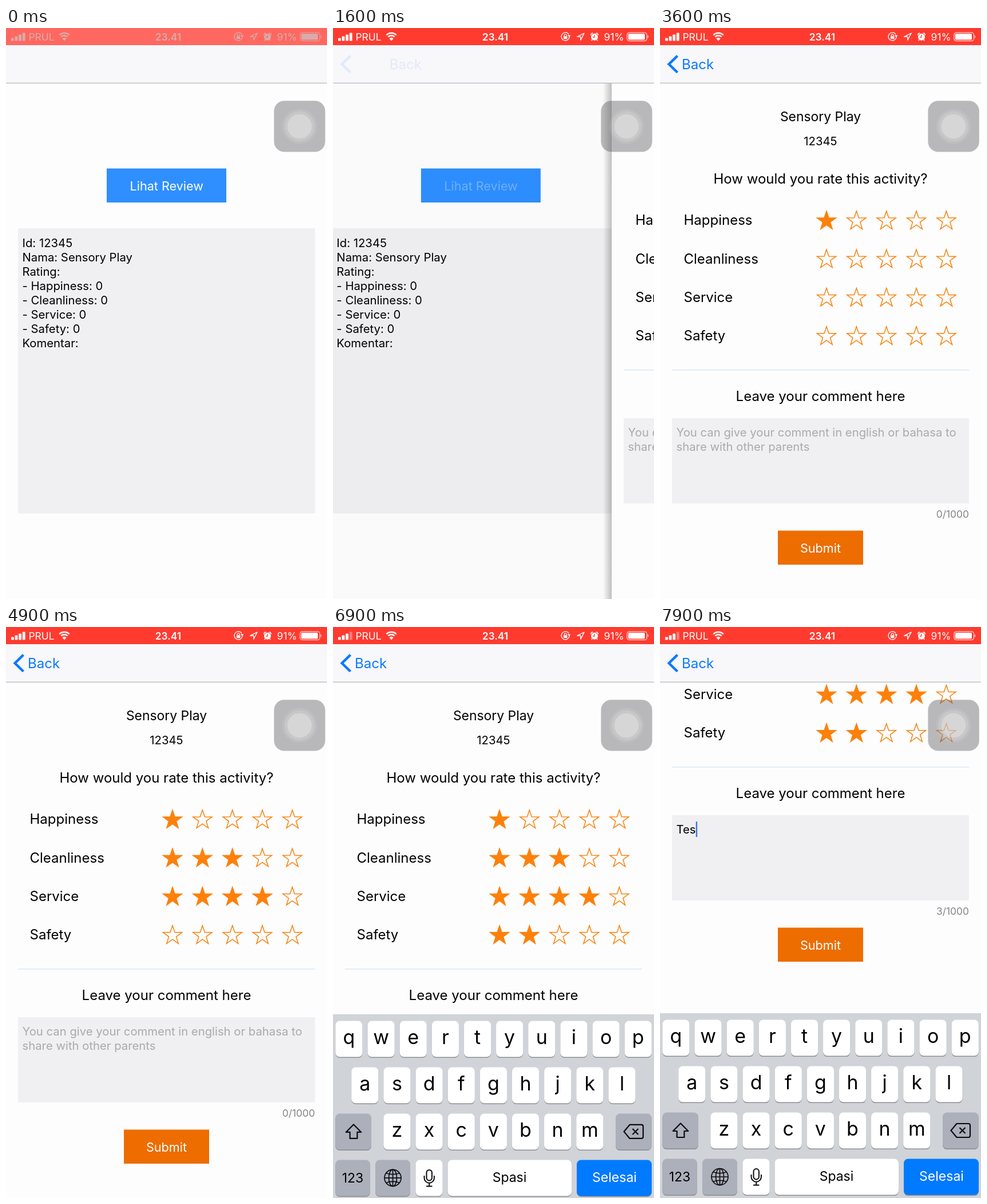
Recreate the animation shown at these times as an HTML page. Size 561 by 998 pixels, loop 8000 ms.

```html
<!DOCTYPE html>
<html lang="id">
<head>
<meta charset="utf-8">
<title>Activity review</title>
<style>
html, body { margin: 0; width: 100%; height: 100%; overflow: hidden; background: #fdfdfe; }
svg { display: block; width: 100vw; height: 100vh; }
text { font-family: Inter, Roboto, "Liberation Sans", sans-serif; white-space: pre; }
</style>
</head>
<body>
<svg id="stage" viewBox="0 0 561 998" xmlns="http://www.w3.org/2000/svg"></svg>
<script>
const W = 561, H = 998, LOOP = 8000;
const stage = document.getElementById('stage');
const ROWS = ['Happiness', 'Cleanliness', 'Service', 'Safety'];
const RATINGS = [[3600, 1], [4200, 3], [4900, 4], [5700, 2]];
const TYPED = [[7400, 'T'], [7600, 'Te'], [7800, 'Tes']];

const text = (x, y, size, str, attrs = '') =>
  `<text x="${x}" y="${y}" font-size="${size}" ${attrs}>${str}</text>`;
const mid = (x, y, size, str, attrs = '') =>
  text(x, y, size, str, 'text-anchor="middle" ' + attrs);
const rect = (x, y, w, h, fill, attrs = '') =>
  `<rect x="${x}" y="${y}" width="${w}" height="${h}" fill="${fill}" ${attrs}/>`;
const line = (d, attrs = '') =>
  `<path d="${d}" fill="none" stroke="currentColor" ${attrs}/>`;

function star(cx, cy, id) {
  const pts = [];
  for (let i = 0; i < 10; i++) {
    const r = i % 2 ? 6.8 : 17.4, a = i * Math.PI / 5;
    pts.push((cx + r * Math.sin(a)).toFixed(2) + ',' + (cy - r * Math.cos(a)).toFixed(2));
  }
  return `<polygon id="${id}" points="${pts.join(' ')}" fill="none" stroke="#fa820c" stroke-width="1.5" stroke-miterlimit="8"/>`;
}

function detailPage() {
  const lines = ['Id: 12345', 'Nama: Sensory Play', 'Rating:',
    ...ROWS.map(r => `- ${r}: 0`), 'Komentar:'];
  return rect(0, 0, W, H, '#fdfdfe')
    + rect(176, 245.5, 209, 59.5, '#2f8fff')
    + mid(280.7, 283.8, 21.6, 'Lihat Review', 'id="look" fill="#fff"')
    + rect(21, 350, 519, 498.5, '#f0eff2')
    + lines.map((s, i) => text(28.5, 382.7 + 25 * i, 20.3, s)).join('');
}

function reviewPage() {
  let s = rect(0, 0, W, H + 400, '#fdfdfe')
    + mid(280.5, 163.4, 22.9, 'Sensory Play')
    + mid(280.5, 205.2, 20.3, '12345')
    + mid(280.5, 271.5, 24, 'How would you rate this activity?');
  ROWS.forEach((name, r) => {
    s += text(41.5, 344.3 + 67.3 * r, 24, name);
    for (let c = 0; c < 5; c++) s += star(291 + 52.35 * c, 337.3 + 67.3 * r, `star${r}${c}`);
  });
  return s + rect(21, 597, 519, 1.6, '#dbe8f5')
    + mid(280.5, 652.4, 24, 'Leave your comment here')
    + rect(21, 682, 519, 149, '#f0eff2')
    + `<g id="hint" fill="#aaa9ad">`
    + text(28.5, 714, 20.3, 'You can give your comment in english or bahasa to')
    + text(28.5, 739.3, 20.3, 'share with other parents') + '</g>'
    + text(28.5, 714, 20.3, '', 'id="typed"')
    + rect(61, 693, 2.4, 27, '#3b78dd', 'id="caret"')
    + text(540, 855.8, 17.4, '0/1000', 'id="count" text-anchor="end" fill="#858589"')
    + rect(206, 878.5, 149, 59.5, '#ed6d00')
    + mid(280.5, 916.6, 21.6, 'Submit', 'fill="#fff"');
}

function statusBar() {
  const bars = [0, 1, 2, 3].map(i =>
    rect(9 + 6.6 * i, 17.5 - 3 * i, 4.8, 5 + 3 * i, 'currentColor', `rx="1" id="bar${i}"`)).join('');
  const arc = r => {
    const d = r * 0.707;
    return line(`M${102 - d} ${21 - d}A${r} ${r} 0 0 1 ${102 + d} ${21 - d}`, 'stroke-width="2.6"');
  };
  return rect(0, 0, W, 30, '#ff3b30', 'id="statusBg"')
    + '<g id="status" fill="currentColor">' + bars
    + text(39.5, 22, 17.4, 'PRUL')
    + arc(12.2) + arc(7.9) + '<path d="M102 22.5L98.4 18.4A5 5 0 0 1 105.6 18.4Z"/>'
    + mid(283.5, 22, 17.4, '23.41', 'font-weight="600"')
    + line('M412 11.2A7 7 0 1 0 413 16', 'stroke-width="1.3"')
    + '<path d="M409.8 12.6L415.4 12.6L413 16.6Z"/>'
    + rect(403, 14.4, 6.4, 4.8, 'currentColor')
    + line('M404.2 14.4V13A2 2 0 0 1 408.2 13V14.4', 'stroke-width="1.2"')
    + line('M439 9.2L426.8 15.2H432.8V21.3Z', 'stroke-width="1.4" stroke-linejoin="round"')
    + '<circle cx="457" cy="15.7" r="6"/>'
    + line('M450.5 12.5A4 4 0 0 1 454.4 9M459.6 9A4 4 0 0 1 463.5 12.5M453 20.4L451.7 22M461 20.4L462.3 22', 'stroke-width="1.6"')
    + '<path id="hands" d="M457 12V16H454" fill="none" stroke="#ff3b30" stroke-width="1.3"/>'
    + text(473.6, 22, 17.4, '91%')
    + rect(514, 8, 34.5, 14.6, 'none', 'rx="3.6" stroke="currentColor" stroke-width="1"')
    + rect(516, 10, 29, 10.6, 'currentColor', 'rx="1.6"')
    + '<path d="M550 12.6Q552.4 15.3 550 18Z"/></g>';
}

function navBar() {
  return rect(0, 30, W, 66, '#f8f7fa') + rect(0, 95.7, W, 1.2, '#b5b5b8')
    + '<g id="back" color="#0a7aff" fill="currentColor">'
    + line('M30.5 48.6L15.6 63.2L30.5 77.8', 'stroke-width="4.4"')
    + text(38, 71.8, 24, 'Back', 'id="backLabel"') + '</g>';
}

function key(x, y, w, fill = '#fff') {
  return rect(x, y + 1.6, w, 63, '#8b8e94', 'rx="7.5"') + rect(x, y, w, 63, fill, 'rx="7.5"');
}

function keyboard() {
  const DARK = '#abb0ba', PITCH = 56.15;
  const rows = [['qwertyuiop', 4.3], ['asdfghjkl', 32.2], ['zxcvbnm', 88.3]];
  let s = rect(0, 675, W, 323, '#d0d3d8');
  rows.forEach(([chars, x0], r) => {
    const y = 686.5 + 81 * r;
    [...chars].forEach((ch, i) => {
      const x = x0 + PITCH * i;
      s += key(x, y, 47.2) + mid(x + 23.6, y + 40.3, 34, ch);
    });
  });
  return s + key(4.3, 848.5, 62.7, DARK) + key(494, 848.5, 62.7, DARK)
    + key(4.3, 929.5, 60.5, DARK) + key(74, 929.5, 61, DARK)
    + key(144.4, 929.5, 47.2) + key(200.5, 929.5, 216.5)
    + key(426, 929.5, 131, '#007aff')
    + mid(34.5, 969, 23, '123') + mid(308.5, 968, 23, 'Spasi')
    + mid(492, 968, 23, 'Selesai', 'fill="#fff"')
    + '<g color="#0b0b0c">'
    + line('M36 867.5L49.3 881H42.4V892H29.6V881H22.7Z', 'stroke-width="2.2" stroke-linejoin="round"')
    + line('M518.5 868H539Q542 868 542 871V889Q542 892 539 892H518.5L508.5 880Z', 'stroke-width="2.2" stroke-linejoin="round"')
    + line('M523.5 875L533.5 885M533.5 875L523.5 885', 'stroke-width="2.2"')
    + '<g fill="none" stroke="currentColor" stroke-width="1.7"><circle cx="104.5" cy="961" r="14.5"/>'
    + '<ellipse cx="104.5" cy="961" rx="7" ry="14.5"/></g>'
    + line('M104.5 946.5V975.5M90 961H119M93 952.5Q104.5 957 116 952.5M93 969.5Q104.5 965 116 969.5', 'stroke-width="1.7"')
    + rect(163.5, 947, 9.4, 18.5, 'none', 'rx="4.7" stroke="currentColor" stroke-width="2"')
    + line('M159.5 957V961A8.7 8.7 0 0 0 176.9 961V957M168.2 970V975.5M163 975.5H173.4', 'stroke-width="2"')
    + '</g>';
}

function floatingButton() {
  const ring = (r, a) => `<circle cx="513" cy="172" r="${r}" fill="#fff" opacity="${a}"/>`;
  return rect(468.4, 127.2, 89.4, 89.4, '#59585b', 'rx="18" opacity=".42"')
    + ring(30.5, .09) + ring(26.5, .13) + ring(21.3, .27);
}

stage.innerHTML = '<defs><linearGradient id="edge"><stop offset="0" stop-opacity="0"/>'
  + '<stop offset="1" stop-opacity=".27"/></linearGradient></defs>'
  + rect(0, 0, W, H, '#fdfdfe')
  + `<g id="detail">${detailPage()}</g>`
  + rect(0, 0, W, H, '#000', 'id="dim"')
  + '<g id="review">' + rect(-15, 0, 15, H, 'url(#edge)', 'id="shade"')
  + `<g id="scroll">${reviewPage()}</g></g>`
  + navBar() + statusBar()
  + `<g id="keys">${keyboard()}</g>` + floatingButton();

const el = {};
stage.querySelectorAll('[id]').forEach(n => el[n.id] = n);
const set = (id, name, value) => el[id].setAttribute(name, value);
const move = (id, x, y) => set(id, 'transform', `translate(${x} ${y})`);
const clamp = v => Math.max(0, Math.min(1, v));
const mix = (a, b, p) => `rgb(${a.map((v, i) => Math.round(v + (b[i] - v) * p))})`;
const easeInOut = p => p < .5 ? 4 * p ** 3 : 1 - (2 - 2 * p) ** 3 / 2;

// Critically damped spring from 0 to 1
function spring(ms, rate) {
  const k = Math.max(0, ms) / 1000 * rate;
  return 1 - (1 + k) * Math.exp(-k);
}

function draw(t) {
  const wake = clamp(t / 500);
  const red = mix([255, 104, 96], [255, 59, 48], wake);
  set('statusBg', 'fill', red);
  set('hands', 'stroke', red);
  set('status', 'color', mix([216, 172, 169], [255, 255, 255], wake));
  set('bar3', 'opacity', t < 6400 ? 1 : .35);

  const push = t < 2200 ? spring(t - 1566, 18) : 1;
  move('detail', -168 * push, 0);
  move('review', W * (1 - push), 0);
  set('dim', 'opacity', .1 * push);
  set('shade', 'opacity', push > 0 ? 1 - push : 0);
  set('back', 'opacity', push < .5 ? push * .7 : clamp(push * 1.3 - .3));
  move('backLabel', 70 * (1 - push), 0);
  set('look', 'opacity', t < 1400 ? 1 : .3);

  RATINGS.forEach(([at, n], r) => {
    for (let c = 0; c < 5; c++) set(`star${r}${c}`, 'fill', t >= at && c < n ? '#ff800a' : 'none');
  });

  const rise = t < 6600 ? 0 : t > 7200 ? 1 : spring(t - 6540, 20);
  move('keys', 0, 323 * (1 - rise));
  move('scroll', 0, -353 * easeInOut(clamp((t - 6950) / 350)));

  const editing = t >= 6600;
  const typed = TYPED.reduce((s, [at, str]) => t >= at ? str : s, '');
  el.typed.textContent = typed;
  el.count.textContent = typed.length + '/1000';
  set('hint', 'opacity', editing ? 0 : 1);
  set('caret', 'opacity', editing ? 1 : 0);
  set('caret', 'x', 28.7 + (typed ? el.typed.getComputedTextLength() : 0));
}

const start = performance.now();
function tick() {
  draw((performance.now() - start) % LOOP);
  requestAnimationFrame(tick);
}
tick();
</script>
</body>
</html>
```
